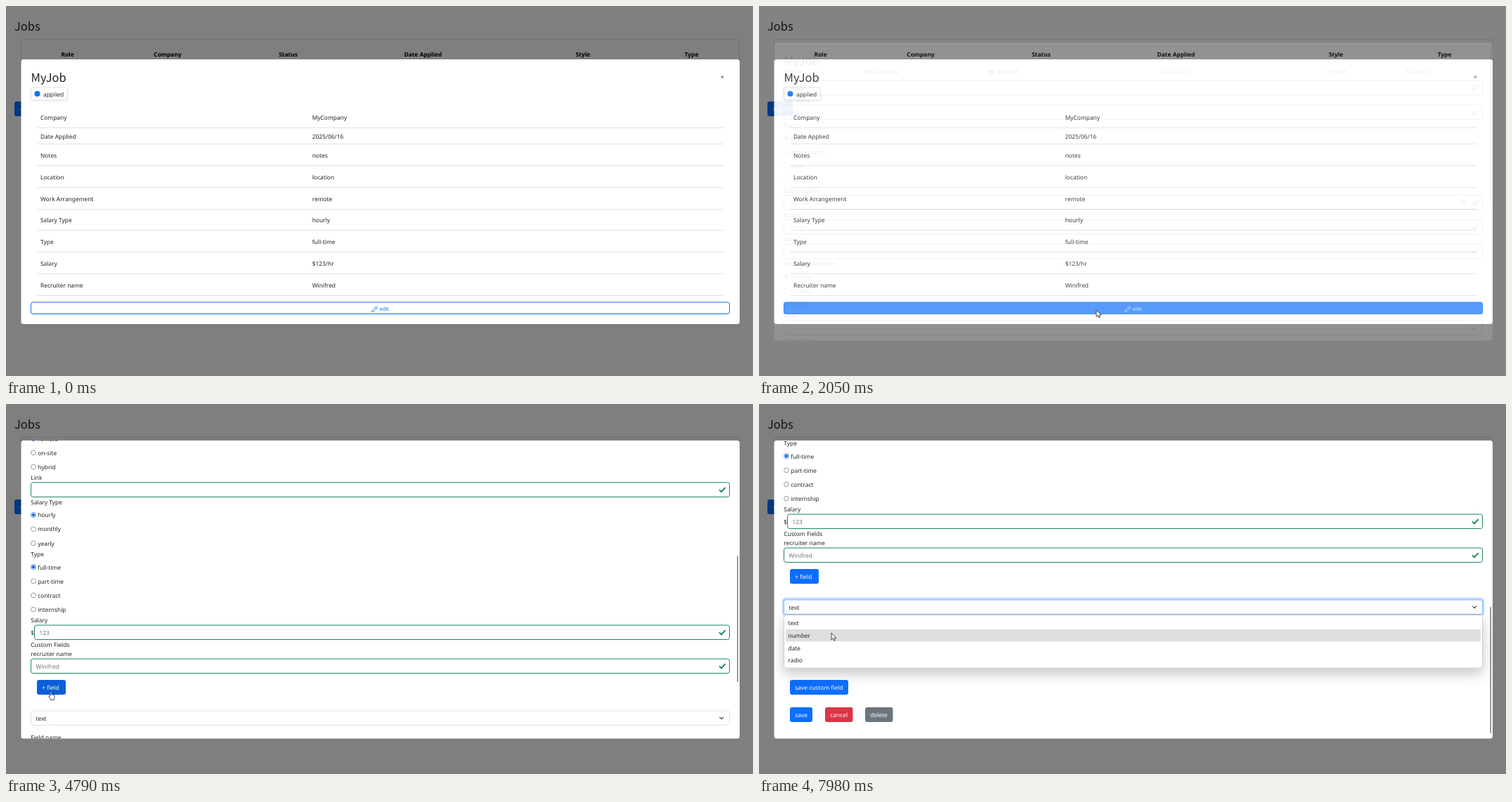
Recreate the animation shown at these times as an HTML page. Size 1063x527 px, loop 8000 ms.

```html
<!DOCTYPE html>
<html lang="en">
<head>
<meta charset="utf-8">
<title>Jobs</title>
<style>
  html, body { margin: 0; width: 100%; height: 100%; overflow: hidden; background: #fff; }
  svg { display: block; width: 1063px; height: 527px; }
  text { font: 8.4px "Noto Sans", sans-serif; fill: #212529; white-space: pre; text-rendering: geometricPrecision; }
  .title { font: 16.5px "Noto Sans CJK JP", "Noto Sans CJK SC", "Noto Sans CJK", "Noto Sans", sans-serif; }
  .head { font-weight: 700; text-anchor: middle; fill: #000; }
  .hint { fill: #6c757d; }
  .small { font-size: 7.4px; }
  .white { fill: #fff; }
</style>
</head>
<body>
<svg id="stage" viewBox="0 0 1063 527"></svg>
<script>
const BLUE = '#0d6efd', GREEN = '#198754', GREY = '#dee2e6';

// Text is placed by the middle of its capitals.
const text = (x, mid, str, cls = '') => `<text x="${x}" y="${mid + 3}" class="${cls}">${str}</text>`;
const title = (x, baseline, str) => `<text x="${x}" y="${baseline}" class="title">${str}</text>`;
const rect = (x, y, w, h, attrs = '') => `<rect x="${x}" y="${y}" width="${w}" height="${h}" ${attrs}/>`;
const line = (d, color, width, attrs = '') =>
  `<path d="${d}" fill="none" stroke="${color}" stroke-width="${width}" ${attrs}/>`;
const box = (x, y, color, attrs = '') =>
  rect(x + .5, y + .5, 1029 - x, 20.5, `rx="3" fill="#fff" stroke="${color}" ${attrs}`);
const button = (x, y, w, color, str, attrs = '') =>
  rect(x, y, w, 21, `rx="3" fill="${color}" ${attrs}`) + text(x + 7.3, y + 11, str, 'white');
const tick = y => line(`M1015 ${y + .3}l3 3 5.5 -6.2`, GREEN, 1.9);

const field = (label, y, value, cls = 'hint', x = 35) =>
  text(35.3, y - 6.5, label) + box(x, y, GREEN) + text(x + 7.5, y + 11, value, cls) + tick(y + 10.5);

const radios = (label, y, options) => text(35.3, y, label) + options.map((name, i) => {
  const cy = y + 18 + i * 20.15;
  return `<circle cx="39" cy="${cy}" r="3.4" fill="#fff" stroke="${i ? '#808080' : '#0b62e0'}" stroke-width=".8"/>` +
    (i ? '' : `<circle cx="39" cy="${cy}" r="2.1" fill="#0b62e0"/>`) + text(45.3, cy + .3, name);
}).join('');

const page = rect(0, 0, 1063, 527, 'fill="#fff"') + title(12, 35, 'Jobs') +
  rect(21.5, 47.5, 1022, 66, `rx="3" fill="none" stroke="${GREY}"`) +
  [['Role', 87.5], ['Company', 230], ['Status', 401.5], ['Date Applied', 593.5], ['Style', 821], ['Type', 975.5]]
    .map(([name, x]) => text(x, 69.3, name, 'head')).join('') +
  [['MyJob', 36], ['MyCompany', 149], ['applied', 339], ['2025/06/16', 571], ['remote', 807], ['full-time', 921]]
    .map(([name, x]) => text(x, 93, name)).join('') +
  `<circle cx="330.5" cy="94.5" r="4" fill="${BLUE}"/>` +
  button(12, 136, 36, BLUE, '+ job');

const backdrop = rect(0, 0, 1063, 527, 'opacity=".5"');

const details = [
  ['Company', 'MyCompany', 159, 173.5], ['Date Applied', '2025/06/16', 186, 196.5],
  ['Notes', 'notes', 213, 227.5], ['Location', 'location', 244, 258.5],
  ['Work Arrangement', 'remote', 274.5, 289.5], ['Salary Type', 'hourly', 305.3, 319.5],
  ['Type', 'full-time', 336.2, 350.5], ['Salary', '$123/hr', 367, 381.5],
  ['Recruiter name', 'Winifred', 398, 412.5],
];

const viewModal = backdrop + rect(21.5, 76, 1022.5, 377, 'rx="3.5" fill="#fff"') +
  title(35.5, 108, 'MyJob') + text(1017, 101, '×') +
  rect(35.5, 116, 52, 18, `rx="3" fill="#fff" stroke="${GREY}" filter="url(#soft)"`) +
  `<circle cx="44.5" cy="125" r="4" fill="${BLUE}"/>` + text(53, 125.5, 'applied') +
  details.map(([name, value, y, rule]) =>
    text(49, y, name) + text(435.7, y, value) + line(`M44 ${rule}H1021`, GREY, 1)).join('') +
  rect(35.5, 422, 994, 16.5, `id="editFill" rx="2.5" fill="${BLUE}" stroke="${BLUE}"`) +
  `<g id="editLabel">${line('M520.6 435.8l.9 -2.6 5.4 -5.4 1.8 1.8 -5.4 5.4zM525.3 429.4l1.8 1.8', 'currentColor', .8)}
   <text x="531.5" y="433.5" class="small" style="fill:currentColor">edit</text></g>`;

const chevron = y => line(`M1015.3 ${y}l2.9 2.9 2.9 -2.9`, '#343a40', 1.1);

const panel = rect(35, 772, 995, 22, `id="focusRing" rx="3" fill="none" stroke="${BLUE}" stroke-width="4.5"`) +
  box(35, 772.5, GREY, 'id="select"') + text(42.6, 784, 'text') + chevron(781.8) +
  text(35.3, 810.5, 'Field name') + box(35, 825, GREY) + text(42.6, 837, 'field name', 'hint') +
  text(35.3, 863, 'Value') + button(44, 887, 83, BLUE, 'save custom field');

const form = title(35.5, 84, 'MyJob') +
  field('Role', 106, 'MyJob') + field('Company', 140.5, 'MyCompany') +
  radios('Status', 169.5, ['applied', 'interviewing', 'offer', 'rejected']) +
  field('Date Applied', 269, ' 06 / 16 / 2025', '') +
  rect(998.3, 276, 7, 6.8, 'rx=".8" fill="#fff" stroke="#444" stroke-width=".9"') +
  line('M998 276.8h7.6M999.8 274.6v1.5M1003.8 274.6v1.5', '#444', 1.2) +
  field('Notes', 304, 'notes') + field('Location', 338.7, 'location') +
  radios('Work Arrangement', 367.3, ['remote', 'on-site', 'hybrid']) +
  field('Link', 447.3, '') +
  radios('Salary Type', 476, ['hourly', 'monthly', 'yearly']) +
  radios('Type', 550.2, ['full-time', 'part-time', 'contract', 'internship']) +
  field('Salary', 650.5, '123', 'hint', 40) + text(35.3, 662, '$') +
  text(35.3, 679, 'Custom Fields') + field('recruiter name', 698.5, 'Winifred') +
  button(44, 729, 41, BLUE, '+ field', 'id="addField"') +
  `<g clip-path="url(#panelClip)">${panel}</g>
   <g id="actions">${button(44, 768, 32, BLUE, 'save')}${button(94, 768, 39.5, '#dc3545', 'cancel')}
   ${button(151, 768, 39.5, '#6c757d', 'delete')}</g>`;

const menu = rect(35.5, 300.5, 994, 75.5, 'rx="3" fill="#fff" stroke="#c4c4c4" stroke-width=".8" filter="url(#drop)"') +
  rect(38, 303, 989, 17.6, 'id="highlight" fill="#dfdfdf"') +
  ['text', 'number', 'date', 'radio'].map((name, i) => text(41.5, 312 + i * 17.8, name)).join('');

const editModal = backdrop + rect(21.5, 52, 1022.5, 424.5, 'rx="3.5" fill="#fff"') +
  `<g clip-path="url(#modalClip)"><g id="form">${form}</g></g>` +
  rect(1040.3, 61, 1.7, 220, 'id="thumb" rx=".8" fill="#8a8a8a"') + `<g id="menu">${menu}</g>`;

const pointers =
  `<g id="cursor" stroke="#222" stroke-width=".8" stroke-linejoin="round" fill="#fff">
   <path id="arrow" d="M0 0V9.8L2.3 7.7 3.8 11 5.4 10.3 3.9 7.2H7Z"/>
   <path id="hand" d="M-.9 7V.9Q0 -.4 .9 .9V4.6L4.4 5.5Q5.3 5.9 5.2 7.2L4.6 10.4V12.4H-.6V11L-3.1 7.8Q-3.3 6.4 -1.9 6.7Z"/>
   <path id="beam" fill="none" d="M-2 -4.5H-.5L0 -4 .5 -4.5H2M0 -4V4M-2 4.5H-.5L0 4 .5 4.5H2"/></g>`;

stage.innerHTML = `<defs>
  <clipPath id="modalClip"><rect x="21.5" y="52" width="1022.5" height="424.5" rx="3.5"/></clipPath>
  <clipPath id="panelClip"><rect id="panelWindow" x="22" y="760" width="1018" height="0"/></clipPath>
  <filter id="soft" x="-20%" y="-30%" width="140%" height="180%"><feDropShadow dx="0" dy="1" stdDeviation="1" flood-opacity=".1"/></filter>
  <filter id="drop" x="-2%" y="-20%" width="104%" height="180%"><feDropShadow dx="0" dy="8" stdDeviation="9" flood-opacity=".22"/></filter>
  </defs>${page}<g id="view">${viewModal}</g><g id="edit">${editModal}</g>${pointers}`;

const $ = id => document.getElementById(id);
const set = (id, attrs) => { for (const key in attrs) $(id).setAttribute(key, attrs[key]); };
const show = (id, on) => set(id, { opacity: +on });
const progress = (t, start, length) => Math.min(1, Math.max(0, (t - start) / length));
const smooth = p => p * p * (3 - 2 * p);
const easeOut = p => 1 - (1 - p) ** 2;
const fade = (t, start) => easeOut(progress(t, start, 150));
const mix = (a, b, p) => `rgb(${a.map((v, i) => v + (b[i] - v) * p)})`;

// time, x, y
const route = [
  [180, 1032, 530], [480, 700, 462], [800, 437, 376], [980, 456, 400], [1120, 480, 432], [1200, 484, 437],
  [1370, 464, 406], [1470, 463, 400], [1740, 480, 433], [2250, 480, 433], [2700, 286, 379], [3020, 286, 379],
  [3480, 69, 418], [3580, 68, 416], [3740, 68, 416], [3820, 64, 409], [4830, 64, 409], [5000, 97, 368],
  [5340, 98, 328], [5440, 98, 328], [5820, 102, 306], [6120, 103, 289], [6960, 103, 289],
  [7400, 105, 366], [7560, 105, 366], [7780, 104, 347], [7980, 103, 326],
];

function pointerAt(t) {
  const next = route.findIndex(stop => stop[0] > t);
  if (next < 0) return route[route.length - 1].slice(1);
  if (next === 0) return route[0].slice(1);
  const [t0, x0, y0] = route[next - 1], [t1, x1, y1] = route[next];
  const p = smooth(progress(t, t0, t1 - t0));
  return [x0 + (x1 - x0) * p, y0 + (y1 - y0) * p];
}

function draw(t) {
  const [x, y] = pointerAt(t);

  const hover = fade(t, 1060) - fade(t, 1300) + fade(t, 1560) - fade(t, 2035);
  set('editFill', { 'fill-opacity': hover });
  $('editLabel').style.color = mix([13, 110, 253], [255, 255, 255], hover);

  const swap = progress(t, 2040, 150);
  show('view', 1 - swap);
  show('edit', swap);

  const opened = smooth(progress(t, 3850, 350));
  const scroll = 336 * smooth(progress(t, 2490, 495)) + 158 * smooth(progress(t, 4800, 480));
  const extra = 158 * opened;
  const thumb = 220 - 40 * opened;
  set('form', { transform: `translate(0 ${-scroll})` });
  set('panelWindow', { height: extra });
  set('actions', { transform: `translate(0 ${extra})` });
  set('thumb', { y: 61 + scroll * (408 - thumb) / (336 + extra), height: thumb });
  set('addField', { fill: mix([13, 110, 253], [11, 94, 215], fade(t, 3790) - fade(t, 4860)) });

  const focus = fade(t, 6400);
  set('focusRing', { 'stroke-opacity': .25 * focus });
  set('select', { stroke: mix([222, 226, 230], [134, 183, 254], focus) });
  show('menu', progress(t, 6450, 80));
  const option = Math.min(3, Math.max(0, Math.floor((y - 303) / 17.8)));
  set('highlight', { y: 303 + option * 17.8 });

  const pressing = t > 3780 && t < 4860, typing = t > 2450 && t < 3150;
  show('cursor', t >= 180);
  show('hand', pressing);
  show('beam', typing);
  show('arrow', !pressing && !typing);
  set('cursor', { transform: `translate(${x} ${y})` });
}

function tickFrame() {
  draw(performance.now() % 8000);
  requestAnimationFrame(tickFrame);
}
tickFrame();
</script>
</body>
</html>
```
